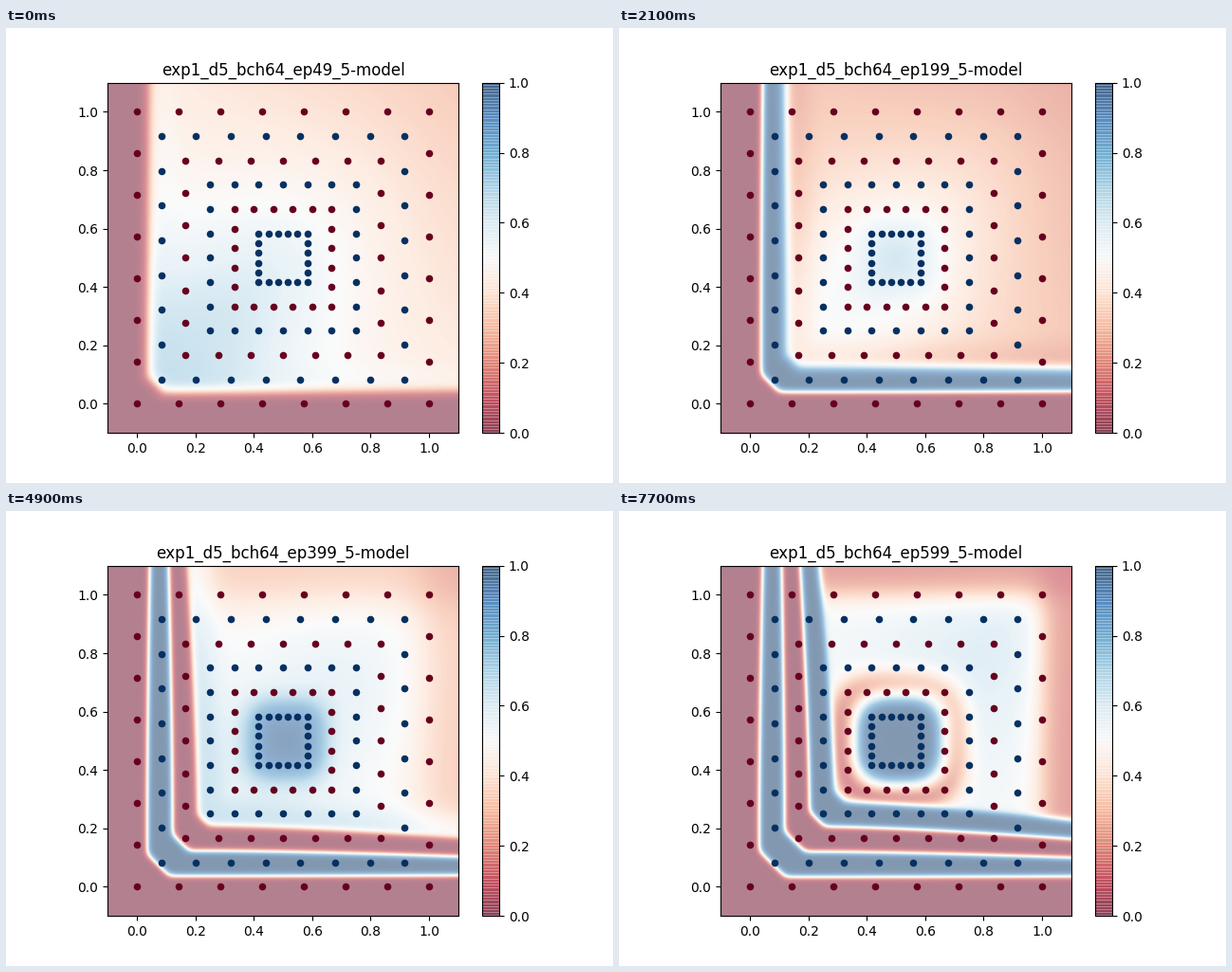
Animation of 640 by 480 pixels, one loop 8000 ms. Source, as a matplotlib script:

```python
import numpy as np
import matplotlib.pyplot as plt
from matplotlib.animation import FuncAnimation

plt.rcParams["text.kerning_factor"] = 6

STEP_MS, TICK_MS, LOOP_MS = 700, 100, 8000
N_STATES = 12
LO, HI, GRID = -0.1, 1.1, 240
CMAP = plt.get_cmap("RdBu")
LEARNED = [-30, 105, 228, 425]  # epoch at which each band edge takes shape

axis = LO + (np.arange(GRID) + .5) * (HI - LO) / GRID
X, Y = np.meshgrid(axis, axis)


def sigmoid(z):
    return 1 / (1 + np.exp(-np.clip(z, -50, 50)))


def mix(a, b, w):
    return a + (b - a) * w


def edge_distance(i, q):
    """Signed distance to the i-th L-shaped edge, positive inside."""
    settle = min(1.6 * q, 1)
    near = mix(.042, .033, q) + .086 * i
    far = .045 + mix(.088, .064, settle) * i

    def line(c, end):
        return mix(near, end, np.clip((c - .25) / .85, 0, 1)**1.5)

    sides = (X - line(Y, far),
             Y - line(X, far - .01 * q),
             (X + Y - .135 - .02 * q - .153 * i) / np.sqrt(2))
    t = .006
    low = np.minimum.reduce(sides)
    return low - t * np.log(sum(np.exp((low - s) / t) for s in sides))


def background(epoch, q):
    """Undecided inner area: plane, drifting glow, red rim, ring, blue core."""
    swing = np.cos(2 * np.pi * (epoch - 49) / 300)
    z = .485 + .07 * swing - .12 * (1 - q) * (X + Y)

    along = (X + Y) / np.sqrt(2) - mix(.35, 1.15, q)
    across = (X - Y) / np.sqrt(2)
    z += mix(.18, .10, q) * np.exp(-(along / .6)**2 - (across / .32)**2)

    rim = sigmoid((epoch - 420) / 100)
    for c in (X, Y):
        w = sigmoid((c - mix(.93, .995, q)) / mix(.07, .028, q))
        z = mix(z, .1, rim * w)

    rho = (abs(X - .51)**3 + abs(Y - .5)**3)**(1 / 3)
    ring = sigmoid((epoch - 515) / 30) * np.exp(-((rho - .2) / .055)**2)
    z = mix(z, .08, ring * (1 - .45 * sigmoid((X + Y - 1) / .1)))

    core = sigmoid((epoch - 240) / 75)
    edge = sigmoid((mix(.11, .14, q) - rho) / mix(.05, .013, q))
    return mix(z, 1, core * edge)


def field(epoch):
    q = (epoch - 49) / 550
    back = background(epoch, q)
    z = np.zeros_like(X)
    for i, born in enumerate(LEARNED):
        layer = back
        if i < 3:  # bands alternate blue, red, blue
            strength = sigmoid((epoch - LEARNED[i + 1]) / (20 + 5 * i))
            layer = mix(back, 1 - i % 2, strength)
        soft = .005 + .02 * np.exp(-max(epoch - born, 0) / 60)
        z = mix(z, layer, sigmoid(edge_distance(i, q) / soft))
    return z


def ring_points(k):
    """Points on the k-th nested square."""
    t = np.linspace(k / 12, 1 - k / 12, 8 - k // 2)
    a, b = np.full_like(t, t[0]), np.full_like(t, t[-1])
    pts = np.column_stack([np.r_[t, t, a, b], np.r_[a, b, t, t]])
    return np.unique(pts.round(6), axis=0)


def stripe_bar(cax, rows=370, cells=256):
    """Darken each pixel row in which two colour cells overlap."""
    cell = np.arange(rows + 1) * cells // rows
    strip = CMAP(cell[:-1])[:, None, :]
    strip[:, 0, 3] = np.where(np.diff(cell) > 0, .5, 0)
    cax.imshow(strip, origin="lower", extent=(0, 1, 0, 1), aspect="auto",
               interpolation="nearest")


epochs = [50 * i + 49 for i in range(N_STATES)]
fields = [field(e) for e in epochs]

fig, ax = plt.subplots(figsize=(6.4, 4.8), dpi=100)
im = ax.imshow(fields[0], cmap=CMAP, vmin=0, vmax=1, alpha=.5,
               origin="lower", extent=(LO, HI, LO, HI),
               interpolation="bilinear")
bar = fig.colorbar(im, ax=ax)
stripe_bar(bar.ax)
for k in range(6):
    ax.scatter(*ring_points(k).T, s=20, color=CMAP(float(k % 2)))
ax.set_xlim(LO, HI)
ax.set_ylim(LO, HI)
title = ax.set_title("")


def update(frame):
    i = min(frame * TICK_MS // STEP_MS, N_STATES - 1)
    im.set_data(fields[i])
    title.set_text(f"exp1_d5_bch64_ep{epochs[i]}_5-model")
    return im, title


anim = FuncAnimation(fig, update, frames=LOOP_MS // TICK_MS,
                     interval=TICK_MS, repeat=True, repeat_delay=0)
plt.show()
```
